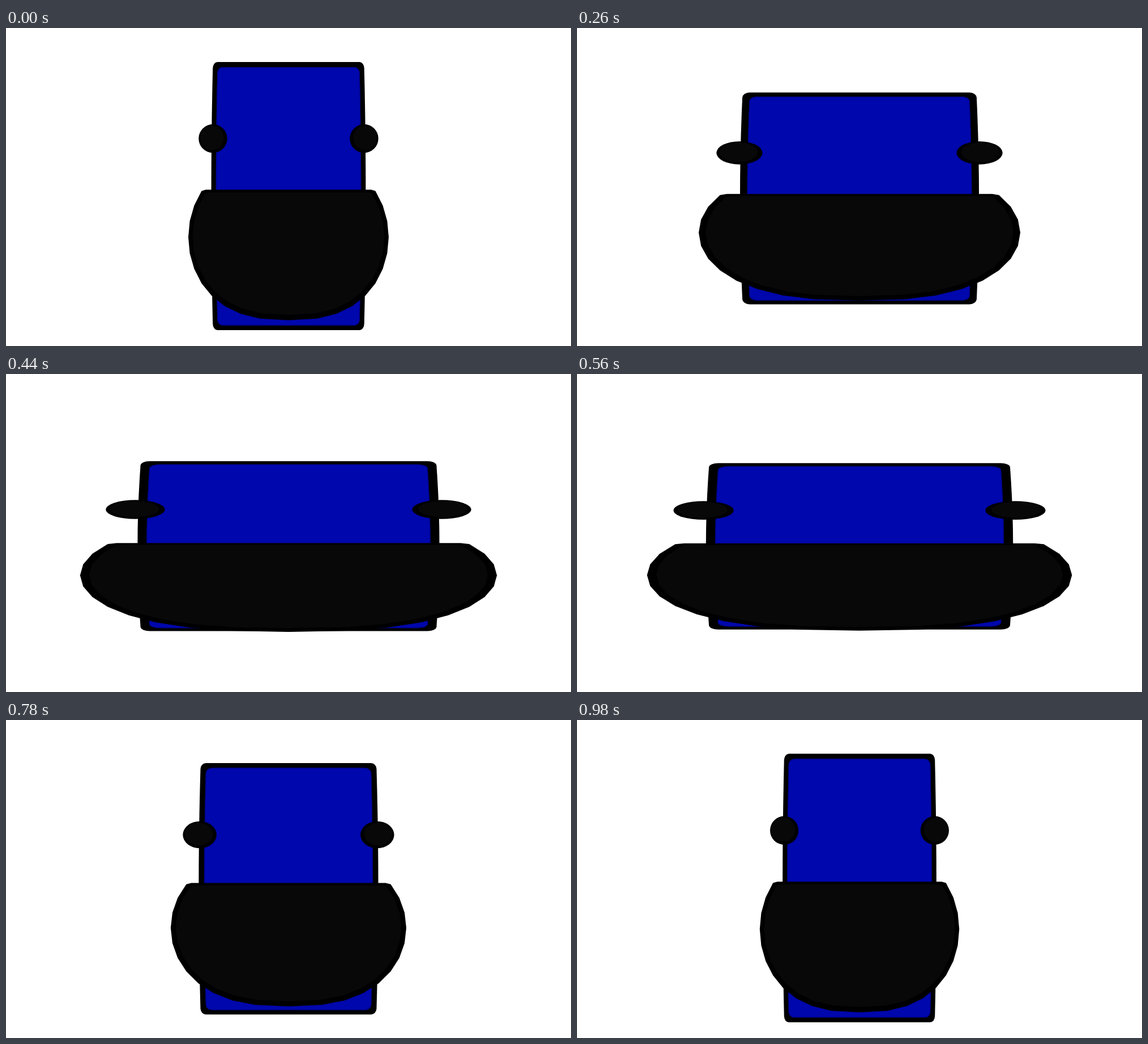
An HTML page with a canvas for the animation above (1 s loop, 998 by 561 pixels).

```html
<!DOCTYPE html>
<html>
<head>
<meta charset="utf-8">
<title>Squash and stretch</title>
<style>
html, body { margin: 0; width: 100%; height: 100%; overflow: hidden; background: #fff; }
canvas { display: block; }
</style>
</head>
<body>
<canvas id="stage" width="998" height="561"></canvas>
<script>
const ctx = document.getElementById('stage').getContext('2d');
const CX = 499, LOOP = 1000, STEP = 20;
const INK = '#000', COAL = '#080808', BLUE = '#0007ac', BLUE_EDGE = '#000590';

// [time, squash]: 0 is tall, 1 is flat; each move overshoots both of its ends
const keys = [[0, 0], [146, -.093], [356, 1.05], [488, .935], [617, 1.05], [855, -.093], [LOOP, 0]];

function squashAt(t) {
  const i = keys.findIndex(k => k[0] > t);
  const [t0, a] = keys[i - 1], [t1, b] = keys[i];
  return a + (b - a) * (1 - Math.cos(Math.PI * (t - t0) / (t1 - t0))) / 2;
}

// Outlines hold the right half only, as [distance from the centre line, height]

// Rounded box whose sides bulge a little
function box(w, top, bottom, rx, ry) {
  const mid = (top + bottom) / 2, h = (bottom - top) / 2, points = [];
  const add = (x, y) => points.push([x * (1 + .022 * (1 - (y / h) ** 2)), mid + y]);
  const corner = (a, side) => add(w - rx + rx * Math.sin(a), side * (h - ry + ry * Math.cos(a)));
  for (let i = 0; i <= 4; i++) corner(i * Math.PI / 8, -1);
  for (let v = -.8; v < .9; v += .2) add(w, v * h);
  for (let i = 4; i >= 0; i--) corner(i * Math.PI / 8, 1);
  return points;
}

// Faceted bowl: a fat ellipse cut off flat at the rim
function bowl(w, h, mid, rim) {
  const points = [[w * .825, rim]];
  for (let i = -3; i <= 8; i++) {
    const a = i * Math.PI / 16;
    points.push([w * Math.max(0, Math.cos(a)) ** .77, mid + h * Math.sin(a)]);
  }
  return points;
}

const bodyOuter = box(133.5, 60, 533, 8, 11);
const bodyInner = box(125.5, 69, 524.7, 9, 10);
const bellyOuter = bowl(177, 146.5, 369, 285.2);
const bellyInner = bowl(169.4, 138, 368, 290);

// Fills a mirrored outline, widened by sx and with heights squeezed around cy by sy
function mirror(points, sx, sy, cy, fill, edge) {
  const right = points.map(([x, y]) => [x * sx, cy + (y - cy) * sy]);
  const left = right.map(([x, y]) => [-x, y]).reverse();
  ctx.beginPath();
  for (const [x, y] of right.concat(left)) ctx.lineTo(CX + x, y);
  ctx.closePath();
  ctx.fillStyle = fill;
  ctx.fill();
  if (!edge) return;
  ctx.save();
  ctx.clip();
  ctx.strokeStyle = edge;
  ctx.lineWidth = 3;
  ctx.stroke();
  ctx.restore();
}

function oval(x, y, rx, ry, fill) {
  ctx.beginPath();
  ctx.ellipse(x, y, rx, ry, 0, 0, 2 * Math.PI);
  ctx.fillStyle = fill;
  ctx.fill();
}

function draw(q) {
  ctx.fillStyle = '#fff';
  ctx.fillRect(0, 0, 998, 561);

  const bodyX = 1 + .985 * q, bodyY = 1 - .3784 * q;
  mirror(bodyOuter, bodyX, bodyY, 316, INK);
  mirror(bodyInner, bodyX, bodyY, 316, BLUE, BLUE_EDGE);

  const reach = 133.5 * (1 + 1.06 * q), armY = 195 + 45.5 * q;
  const rx = 25.2 + 27.8 * q, ry = 25.2 - 8.7 * q;
  for (const side of [-1, 1]) {
    oval(CX + side * reach, armY, rx, ry, INK);
    oval(CX + side * (reach + 1.5), armY - 1, rx * .83, ry * .84, COAL);
  }

  // The belly sits nearer the viewer, so it widens a little faster when flat
  const bellyX = 1 + 1.055 * q + .062 * q * q, bellyY = 1 - .33 * q;
  mirror(bellyOuter, bellyX, bellyY, 326, INK);
  mirror(bellyInner, bellyX, bellyY, 326, COAL);
}

const start = performance.now();
function frame() {
  const t = (performance.now() - start) % LOOP;
  draw(squashAt(Math.floor(t / STEP) * STEP));
  requestAnimationFrame(frame);
}
frame();
</script>
</body>
</html>
```
